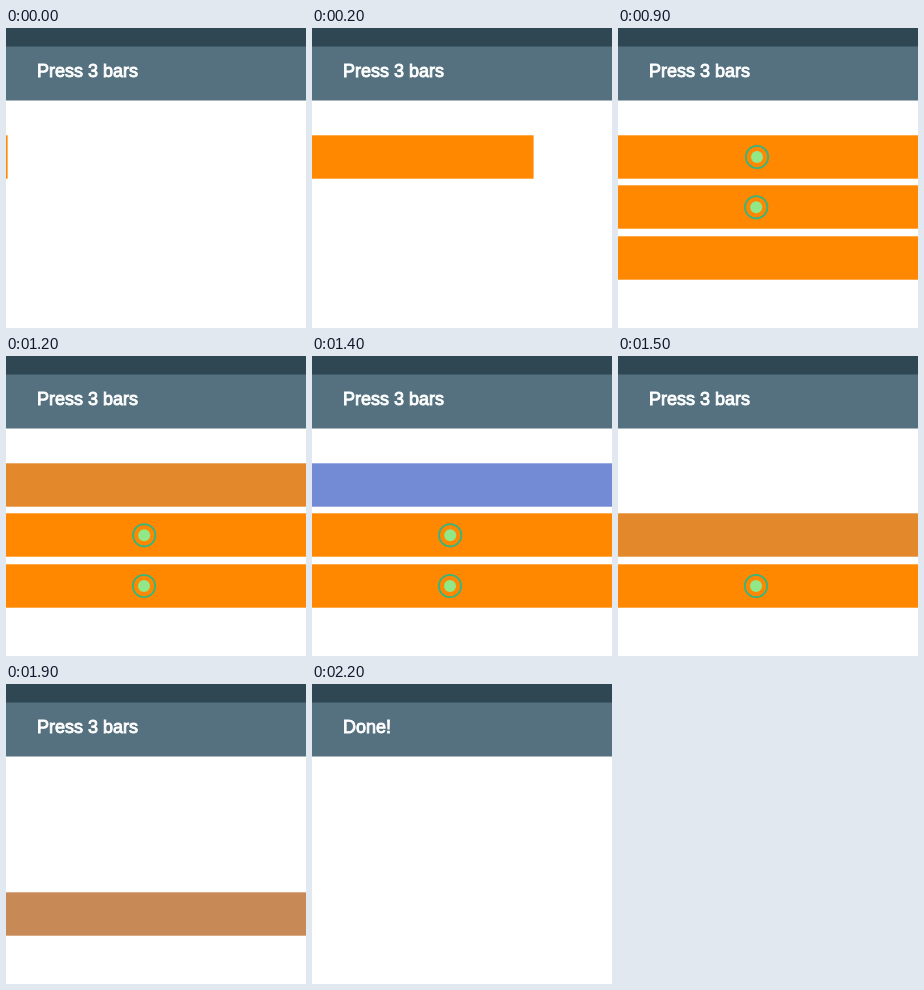
Recreate the animation shown at these times as an HTML page. Size 300 by 300 pixels, loop 2800 ms.

```html
<!DOCTYPE html>
<html lang="en">
<head>
<meta charset="utf-8">
<title>Press 3 bars</title>
<style>
  /* One tick is 100 ms; everything below is derived from it. */
  @property --tick {
    syntax: "<integer>";
    inherits: true;
    initial-value: 0;
  }
  @keyframes tick {
    from { --tick: 0; }
    to { --tick: 28; }
  }

  html, body {
    margin: 0;
    width: 100%;
    height: 100%;
    overflow: hidden;
    background: #fff;
  }
  svg {
    display: block;
    width: 300px;
    height: 300px;
    animation: tick 2800ms steps(28) infinite;
  }

  .header { fill: #55717f; }
  .status { fill: #2e4753; }
  text {
    font: 18px "Liberation Sans", Arial, sans-serif;
    fill: #fff;
    stroke: #fff;
    stroke-width: 0.9px;
  }
  .task { opacity: clamp(0, 22 - var(--tick), 1); }
  .done { opacity: clamp(0, var(--tick) - 21, 1); }

  /* --enter, --press and --release are given in ticks. */
  .row {
    --held: (var(--tick) - var(--release));
    --mix: clamp(0, var(--held) / 3, 1);
  }
  .bar {
    width: clamp(0px, 1.6px + 110px * (var(--tick) - var(--enter)), 300px);
    height: 43.4px;
    fill: rgb(calc(255 - 168 * var(--mix)), calc(136 + 4 * var(--mix)), calc(255 * var(--mix)));
    opacity: clamp(0, (3.5 - var(--held)) * 9, 1);
  }
  .touch {
    --shown: clamp(0, var(--tick) - var(--press) + 1, 1);
    opacity: calc(var(--shown) * clamp(0, (var(--release) - var(--tick)) * 9, 1));
  }
  .ring { fill: none; stroke: #35b580; stroke-width: 1.8px; }
  .dot { fill: #90e888; }

  .one   { --enter: 0;   --press: 4;  --release: 11.5; }
  .two   { --enter: 2.7; --press: 8;  --release: 14.5; }
  .three { --enter: 6.2; --press: 11; --release: 18; }
</style>
</head>
<body>
<svg viewBox="0 0 300 300">
  <defs>
    <g id="mark">
      <circle class="ring" r="11.2"/>
      <circle class="dot" r="6"/>
    </g>
  </defs>
  <rect class="header" width="300" height="72.5"/>
  <rect class="status" width="300" height="18.5"/>
  <text class="task" x="31" y="49">Press 3 bars</text>
  <text class="done" x="31" y="49">Done!</text>

  <g class="row one">
    <rect class="bar" y="107.3"/>
    <use class="touch" href="#mark" x="139" y="129"/>
  </g>
  <g class="row two">
    <rect class="bar" y="157.3"/>
    <use class="touch" href="#mark" x="138.2" y="179.3"/>
  </g>
  <g class="row three">
    <rect class="bar" y="208.3"/>
    <use class="touch" href="#mark" x="138" y="230"/>
  </g>
</svg>
</body>
</html>
```
